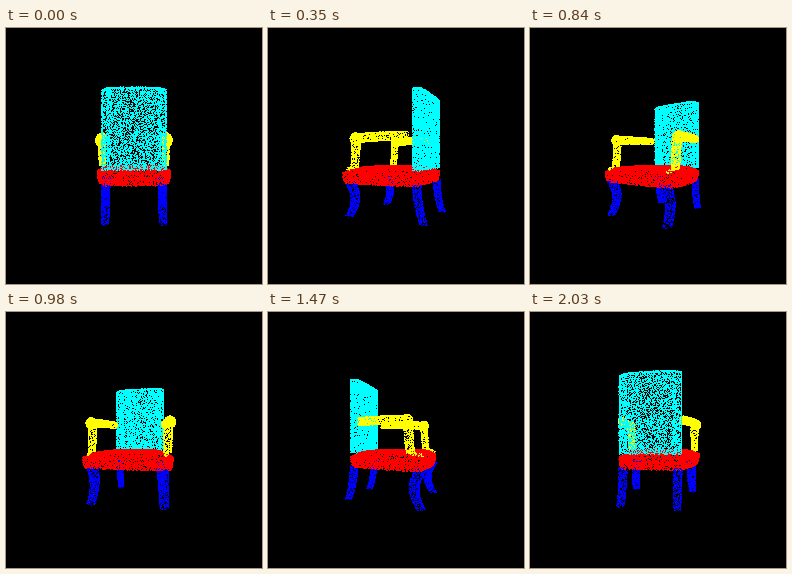
A matplotlib script for the animation above (2.1 s loop, 256x256 px).

```python
import numpy as np
import matplotlib.pyplot as plt
from matplotlib.animation import FuncAnimation

SIZE, FRAMES, STEP = 256, 30, 70
CAMERA = 225          # camera distance; one unit is one pixel at the pivot
CYAN, YELLOW = (0, 255, 255), (255, 255, 0)
RED, BLUE = (255, 0, 0), (0, 0, 255)

rng = np.random.default_rng(7)
points, colors = [], []


def add(x, y, z, color):
    points.append(np.column_stack(np.broadcast_arrays(x, y, z)))
    colors.append(np.tile(np.array(color, np.uint8), (len(points[-1]), 1)))


def tube(curve, radius, n, color, side, upright=True):
    """Scatter points on a tube around curve(t) -> x, y, z for t in 0..1."""
    t, a = rng.random(n), rng.uniform(0, 2 * np.pi, n)
    x, y, z = curve(t)
    r = radius(t)
    x = x + r * np.cos(a)
    if upright:
        z = z + r * np.sin(a)
    else:
        y = y + r * np.sin(a)
    add(side * x, y, z, color)


def ball(center, r, n, color, side):
    v = rng.normal(size=(n, 3))
    v *= r / np.linalg.norm(v, axis=1)[:, None]
    x, y, z = (v + center).T
    add(side * x, y, z, color)


def build_back(half=27, front=31, rear=36, bottom=-12.5):
    def top(x):
        return 58 - 2 * np.abs(x / half) ** 6

    def panel(x, z):
        y = bottom + (top(x) - bottom) * rng.random(len(x))
        add(x, y, z, CYAN)

    for z in (front, rear):
        panel(rng.uniform(-half, half, 2600), z)
    for side in (-1, 1):
        panel(np.full(550, side * half), rng.uniform(front, rear, 550))
        panel(side * rng.uniform(20, 23, 300), rear)
    x = rng.uniform(-half, half, 400)
    add(x, top(x), rng.uniform(front, rear, 400), CYAN)


def half_width(z):
    return 36.8 - 0.175 * z - 0.0027 * z ** 2


def seat_rim(n):
    """Random points on the outline: two sides, straight rear, bowed front."""
    part = rng.choice(4, n, p=[0.25, 0.25, 0.2, 0.3])
    u = rng.uniform(-1, 1, n)
    z = np.where(part < 2, 1 + 35 * u,
                 np.where(part == 2, 36, -34 - 3 * (1 - u ** 2)))
    across = np.where(part == 0, -1, np.where(part == 1, 1, u))
    return across * half_width(z), z


def build_seat():
    x, z = seat_rim(5000)
    k = np.sqrt(rng.random(5000))
    add(x * k, -10 - 6 * k ** 6, z * k, RED)

    x, z = seat_rim(2800)
    u = rng.random(2800)
    bulge = 1 - 0.05 * u ** 3
    add(x * bulge, -15 - 10.5 * u, z * bulge, RED)

    x, z = seat_rim(900)
    k = 0.95 * np.sqrt(rng.random(900))
    add(x * k, -25.5, z * k, RED)


def front_leg(t):
    return 31 + 1.5 * t ** 2, -24 - 33 * t, -32 + 6 * np.sin(np.pi * t)


def rear_leg(t):
    return 24 + 0 * t, -24 - 32.5 * t, 34 + 6 * t ** 2


def arm(t):
    return 28 + 8 * np.sin(np.pi * t / 2), 17 - t ** 3, 27 - 48 * t


def post(t):
    return 35 + 0 * t, 13 - 24 * t, -22 - 2 * t ** 2


def post_foot(t):
    return 35 - t, -11 - 1.5 * t, -24 - 10 * t


def build_frame():
    for side in (-1, 1):
        tube(front_leg, lambda t: 5.3 - 1.7 * np.sqrt(t), 650, BLUE, side)
        tube(rear_leg, lambda t: 3.6 - 0.5 * t, 560, BLUE, side)
        tube(arm, lambda t: 3.6 + 0.5 * t, 1300, YELLOW, side, upright=False)
        ball((36.5, 15.8, -21), 5.2, 400, YELLOW, side)
        tube(post, lambda t: 3.9 - 0.5 * t, 420, YELLOW, side)
        tube(post_foot, lambda t: 1.2 + 0 * t, 40, YELLOW, side, upright=False)


build_back()
build_seat()
build_frame()
X, Y, Z = np.vstack(points).T
RGB = np.vstack(colors)


def render(frame):
    a = 2 * np.pi * frame / FRAMES
    x = X * np.cos(a) + Z * np.sin(a)
    z = Z * np.cos(a) - X * np.sin(a)
    scale = CAMERA / (CAMERA - z)
    col = np.floor(128 + x * scale).astype(int)
    row = np.floor(128 - Y * scale).astype(int)
    far_to_near = np.argsort(z)
    img = np.zeros((SIZE, SIZE, 3), np.uint8)
    img[row[far_to_near], col[far_to_near]] = RGB[far_to_near]
    return img


fig = plt.figure(figsize=(2.56, 2.56), dpi=100, facecolor="black")
ax = fig.add_axes([0, 0, 1, 1])
ax.axis("off")
picture = ax.imshow(render(0), interpolation="nearest", aspect="auto")


def update(frame):
    picture.set_data(render(frame))
    return [picture]


anim = FuncAnimation(fig, update, frames=FRAMES, interval=STEP,
                     repeat=True, repeat_delay=0, blit=False)
plt.show()
```
